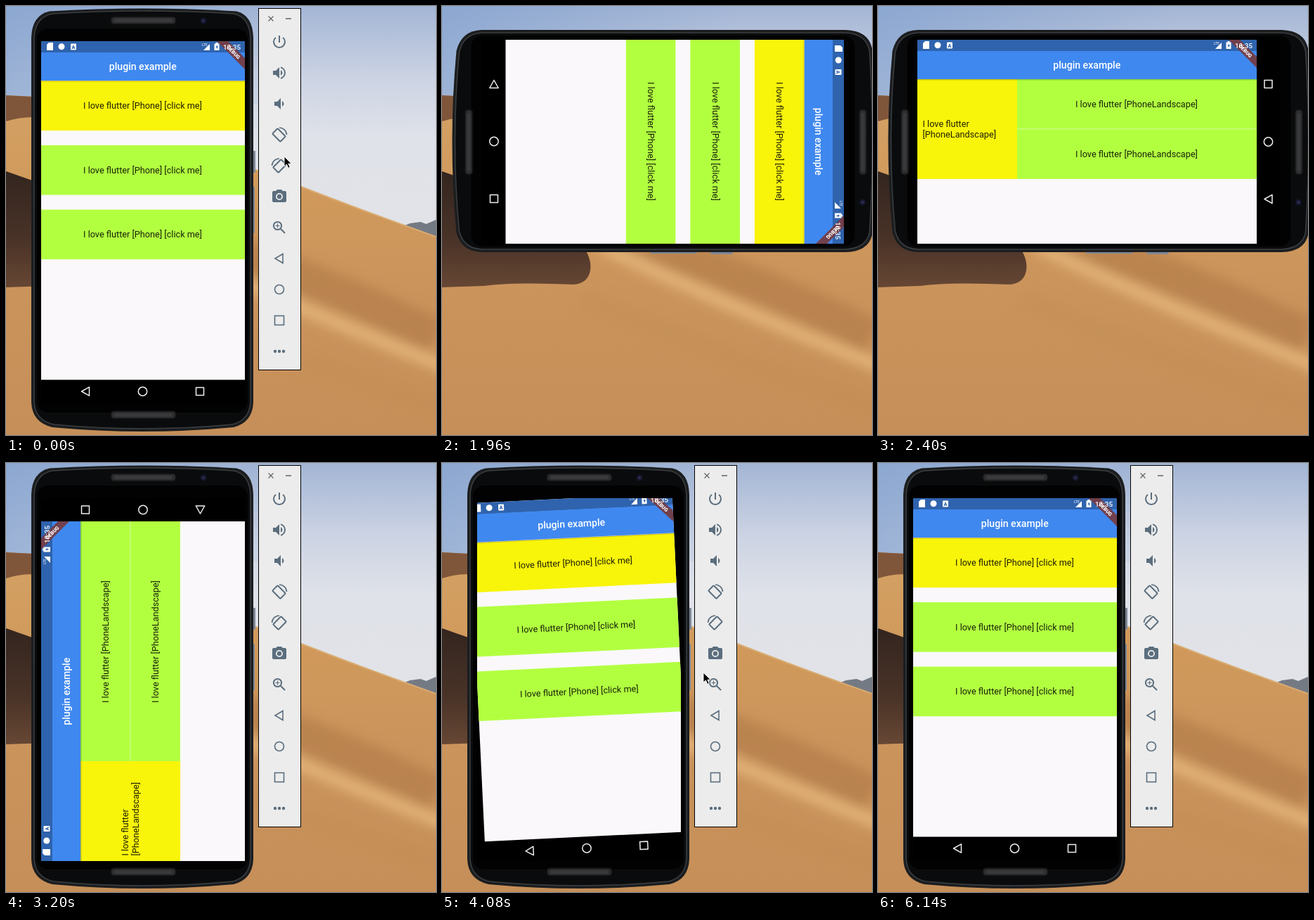
An HTML page that plays this animation: 612x610 px, repeating every 6240 ms.

```html
<!DOCTYPE html>
<html lang="en">
<head>
<meta charset="utf-8">
<title>Plugin example</title>
<style>
  html, body { margin: 0; width: 100%; height: 100%; overflow: hidden; }
  svg { display: block; width: 612px; height: 610px; }
  text { font-family: Roboto, sans-serif; font-size: 12.7px; fill: #000000de; }
  .mid { text-anchor: middle; }
  .title { font-size: 14.1px; font-weight: 500; fill: #fff; }
  .clock { font-size: 9.9px; font-weight: 500; fill: #fff; }
  .tiny { font-size: 7.2px; font-weight: 900; }
  .icon { fill: #5b6e7e; }
  .line { fill: none; stroke: #5b6e7e; stroke-width: 2; }
  .nav { fill: none; stroke: #eee; stroke-width: 1.5; stroke-linejoin: round; }
</style>
</head>
<body>
<svg id="stage" viewBox="0 0 612 610"></svg>
<script>
const LOOP = 6240, TURN = 400;
const TO_LANDSCAPE = 1250, LANDSCAPE_TURN = 1990;
const TO_PORTRAIT = 3100, PORTRAIT_TURN = 3880;
const YELLOW = '#f8f40a', GREEN = '#b2ff40';

const box = (x, y, w, h, fill, extra = '') =>
  `<rect x="${x}" y="${y}" width="${w}" height="${h}" fill="${fill}" ${extra}/>`;
const label = (x, y, s, cls = '') => `<text x="${x}" y="${y}" class="${cls}">${s}</text>`;
const at = (x, y, s) => `<g transform="translate(${x} ${y})">${s}</g>`;
const gradient = (id, stops, dir = 'x2="0" y2="1"') =>
  `<linearGradient id="${id}" ${dir}>${stops.map(([o, c]) =>
    `<stop offset="${o}" stop-color="${c}"/>`).join('')}</linearGradient>`;

const desktop = `
  <defs>
    ${gradient('sky', [[0, '#a3b5d5'], [.3, '#ccd3e3'], [.55, '#dfe2e9'], [1, '#e2e3e7']])}
    ${gradient('haze', [[0, '#7f9fce'], [1, '#7f9fce00']], 'x2="1" y2="0"')}
    ${gradient('sand', [[0, '#d4a164'], [.3, '#d0995b'], [.6, '#ca935c'], [1, '#c68f59']])}
    ${gradient('shade', [[0, '#33251f'], [.6, '#4a3328'], [1, '#674734']])}
    <filter id="soft" x="-20%" y="-40%" width="140%" height="180%"><feGaussianBlur stdDeviation="8"/></filter>
  </defs>
  ${box(0, 0, 612, 340, 'url(#sky)')}
  ${box(0, 0, 420, 140, 'url(#haze)', 'opacity=".65"')}
  <path d="M558 316L575 309 590 307 598 310 612 304V330H558z" fill="#747a84"/>
  <path d="M0 127L40 129C160 150 260 200 350 230L420 256Q518 294 612 327V610H0z" fill="url(#sand)"/>
  <path d="M0 127L40 129V158Q18 158 0 164z" fill="#80563b"/>
  <path d="M350 231L420 257Q518 295 612 328" fill="none" stroke="#e0b77f" stroke-width="2" opacity=".6"/>
  <g fill="none" filter="url(#soft)">
    <path d="M250 325Q440 385 612 470" stroke="#aa7443" stroke-width="50" opacity=".5"/>
    <path d="M225 340Q400 425 630 515" stroke="#e2b378" stroke-width="18"/>
    <path d="M200 415Q400 500 630 575" stroke="#bf8650" stroke-width="30" opacity=".25"/>
  </g>
  <path d="M0 235L40 249 195 335Q214 356 211 376 208 394 188 396 100 392 60 398L0 400z" fill="url(#shade)"/>`;

const speaker = y =>
  box(149, y, 93, 11, '#2b2c2e', 'rx="5" stroke="#111" stroke-width="2"') +
  box(154, y + 3, 83, 5, '#39393b', 'rx="2"');
const phone = `
  ${box(350, 206, 5, 31, '#7c8797')}${box(350, 257, 4, 66, '#7c8797')}
  <path d="M36 45Q37 13 62 7.500 195-.5 328 7.500 351 13 352 45V563Q351 592 324 599 195 611 66 599 37 592 36 563z" fill="#1b1d1f"/>
  <path d="M40 46Q41 16 66 11 195 3 324 11 347 16 348 46V562Q347 589 322 595 195 607 68 595 41 589 40 562z" fill="#0a0b0c" stroke="#3b3e41" stroke-width="1.5"/>
  ${box(44, 32, 300, 546, '#020202', 'rx="16"')}
  ${speaker(15)}${speaker(576)}
  <circle cx="281" cy="21" r="4.5" fill="#15162b"/><circle cx="281" cy="21" r="2" fill="#2c2d55"/>`;

const header = w => `
  ${box(0, 56, w, 1.5, '#0003')}
  ${box(0, 0, w, 16.5, '#2f63ad')}${box(0, 16, w, 40, '#3f88ef')}
  <path d="M11 2h6v11H8V5z" fill="#fff"/>
  <circle cx="29" cy="7.8" r="4.5" fill="#fff"/>
  ${box(42, 3.5, 8, 9, '#fff', 'rx="1"')}
  <text x="46" y="10.6" class="mid tiny" style="fill:#2f63ad">A</text>
  ${label(w / 2 - .2, 41, 'plugin example', 'title mid')}
  ${at(w, 0, `
    <path d="M-40 0h16L0 24V40z" fill="#743c44" fill-opacity=".94"/>
    <g transform="translate(-16 16) rotate(45)"><text y="2.6" class="mid tiny" style="fill:#fff">DEBUG</text></g>
    <text x="-61" y="6.5" style="font-size:5px;fill:#fff">LTE</text>
    <path d="M-50 4V13H-59z" fill="#fff"/>
    <path d="M-41.5 2h3v1.5h2V13h-7V3.5h2z" fill="#fff"/>
    <path d="M-39.5 5l-2 4h1.5v2.5l2-4h-1.5z" fill="#2f63ad"/>
    ${label(-18.5, 12, '10:35', 'clock mid')}`)}`;

const navIcons = (back, home, recent) => `<g class="nav">
  ${at(...back, '<path d="M-5.5 0l11-6.2v12.4z"/>')}
  ${at(...home, '<circle r="6.2"/>')}
  ${at(...recent, '<rect x="-5.500" y="-5.500" width="11" height="11"/>')}</g>`;

const portraitRow = (y, fill) => box(0, y, 290, 70.6, fill) +
  label(144.5, y + 39.5, 'I love flutter [Phone] [click me]', 'mid');
const portraitUI = `
  ${box(0, 0, 290, 516, '#000')}${box(0, 0, 290, 481.5, '#faf8fa')}
  ${portraitRow(56.5, YELLOW)}${portraitRow(148, GREEN)}${portraitRow(239.6, GREEN)}
  ${header(290)}
  ${navIcons([63, 498], [144.5, 498], [226, 498])}`;

const landscapeRow = y => box(142, y, 341, 70.7, GREEN) +
  label(312, y + 40, 'I love flutter [PhoneLandscape]', 'mid');
const landscapeUI = `
  ${box(0, 0, 516, 290, '#000')}${box(0, 0, 483, 290, '#faf8fa')}
  ${box(0, 56, 142, 142, YELLOW)}${landscapeRow(56)}${landscapeRow(127.2)}
  ${label(7.5, 124, 'I love flutter')}${label(7.5, 139, '[PhoneLandscape]')}
  ${header(483)}
  ${navIcons([499.5, 226.5], [499.5, 145], [499.5, 63])}`;

const glyph = (y, d) => `<path class="icon" transform="translate(377 ${y - 12})" d="${d}"/>`;
const sketch = (y, s) => `<g class="line" transform="translate(389 ${y})">${s}</g>`;
const turnIcon = `<rect x="-8" y="-5.3" width="16" height="10.6" rx="1" transform="translate(-.5 .5) rotate(45)"/>
  <path d="M0-10A10.5 10.5 0 0 1 10.5 0" stroke-width="1.6"/>`;
const toolbar = `
  ${box(359.5, 3.5, 60, 514, '#ececec', 'stroke="#000"')}
  <path d="M373.5 14.5l7 7m0-7l-7 7M398 18h8" stroke="#666" stroke-width="1.3"/>
  ${glyph(51, 'M13 3h-2v10h2zM17.83 5.17l-1.42 1.42A7 7 0 1 1 7.58 6.58L6.17 5.17A9 9 0 1 0 17.83 5.17z')}
  ${glyph(95, 'M3 9v6h4l5 5V4L7 9zM16.5 12A4.5 4.5 0 0 0 14 7.97v8.05A4.5 4.5 0 0 0 16.5 12zM14 3.23v2.06a7 7 0 0 1 0 13.42v2.06a9 9 0 0 0 0-17.54z')}
  ${glyph(139, 'M18.5 12A4.5 4.5 0 0 0 16 7.97v8.05A4.5 4.5 0 0 0 18.5 12zM5 9v6h4l5 5V4L9 9z')}
  ${sketch(183, turnIcon)}
  ${sketch(227, `<g transform="scale(-1 1)">${turnIcon}</g>`)}
  ${glyph(271, 'M9 2L7.2 4H4a2 2 0 0 0-2 2v12a2 2 0 0 0 2 2h16a2 2 0 0 0 2-2V6a2 2 0 0 0-2-2h-3.2L15 2zM12 17a5 5 0 1 1 0-10 5 5 0 1 1 0 10zM12 15.2a3.2 3.2 0 1 0 0-6.4 3.2 3.2 0 1 0 0 6.4z')}
  ${sketch(315, '<circle cx="-2.5" cy="-2.5" r="5.6"/><path d="M2 2l6 6"/><path d="M-5.5-2.5h6m-3-3v6" stroke-width="1.2"/>')}
  ${sketch(359, '<path d="M-6 0l11-6.5v13z" stroke-width="1.6"/>')}
  ${sketch(403, '<circle r="6.5" stroke-width="1.6"/>')}
  ${sketch(447, '<rect x="-6.5" y="-6.5" width="13" height="13" stroke-width="1.6"/>')}
  ${[383, 389, 395].map(x => `<circle class="icon" cx="${x}" cy="491" r="2.2"/>`).join('')}`;

const $ = id => document.getElementById(id);
$('stage').innerHTML = `
  ${desktop}
  <clipPath id="glass"><rect id="glassBox"/></clipPath>
  <g id="phone">${phone}</g>
  <g id="screen"><g clip-path="url(#glass)">
    ${box(-258, -258, 516, 516, '#000')}
    <g id="content">
      <g id="portrait" transform="translate(-145 -258)">${portraitUI}</g>
      <g id="landscape" transform="translate(-258 -145)">${landscapeUI}</g>
    </g>
  </g></g>
  <g id="toolbar">${toolbar}</g>
  <path id="cursor" d="M0 0V14L3.4 11 5.8 16.4 8.2 15.3 5.8 10.2H10.3z" fill="#000" stroke="#fff" stroke-width=".9"/>`;

const clamp = v => Math.min(1, Math.max(0, v));
const set = (id, attrs) => {
  for (const [name, value] of Object.entries(attrs)) $(id).setAttribute(name, value);
};

// [time, x, y] of the pointer tip
const paths = [
  [[0, 396, 214], [900, 393, 223], [TO_LANDSCAPE, 393, 223]],
  [[3600, 620, 330], [4040, 372, 298], [4200, 372, 298], [4700, 330, 625]],
];
function pointer(t) {
  for (const path of paths)
    for (let i = 1; i < path.length; i++) {
      const [t0, x0, y0] = path[i - 1], [t1, x1, y1] = path[i];
      if (t < t0 || t >= t1) continue;
      const k = (t - t0) / (t1 - t0), e = k * k * (3 - 2 * k);
      return [x0 + (x1 - x0) * e, y0 + (y1 - y0) * e];
    }
  return [-50, -50];
}

function draw() {
  const t = performance.now() % LOOP;
  const wide = t >= TO_LANDSCAPE && t < TO_PORTRAIT;
  const late = t >= TO_PORTRAIT;
  const turn = clamp((t - (late ? PORTRAIT_TURN : LANDSCAPE_TURN)) / TURN);
  const start = wide ? 90 : late ? -90 : 0;
  const angle = start * (1 - turn) ** 5;
  const fade = wide || late ? clamp(turn / .4) : 0;

  set('phone', { transform: wide ? 'translate(311.5 193) rotate(90) translate(-195 -308)' : '' });
  set('screen', { transform: wide ? 'translate(314 193)' : 'translate(195 308)' });
  set('glassBox', wide ? { x: -258, y: -145, width: 516, height: 290 }
                       : { x: -145, y: -258, width: 290, height: 516 });
  set('content', { transform: `rotate(${angle})` });
  set('portrait', { opacity: late ? fade : 1 - fade });
  set('landscape', { opacity: late ? 1 - fade : fade });
  set('toolbar', { visibility: wide ? 'hidden' : 'visible' });
  set('cursor', { transform: `translate(${pointer(t)})` });
  requestAnimationFrame(draw);
}
draw();
</script>
</body>
</html>
```
